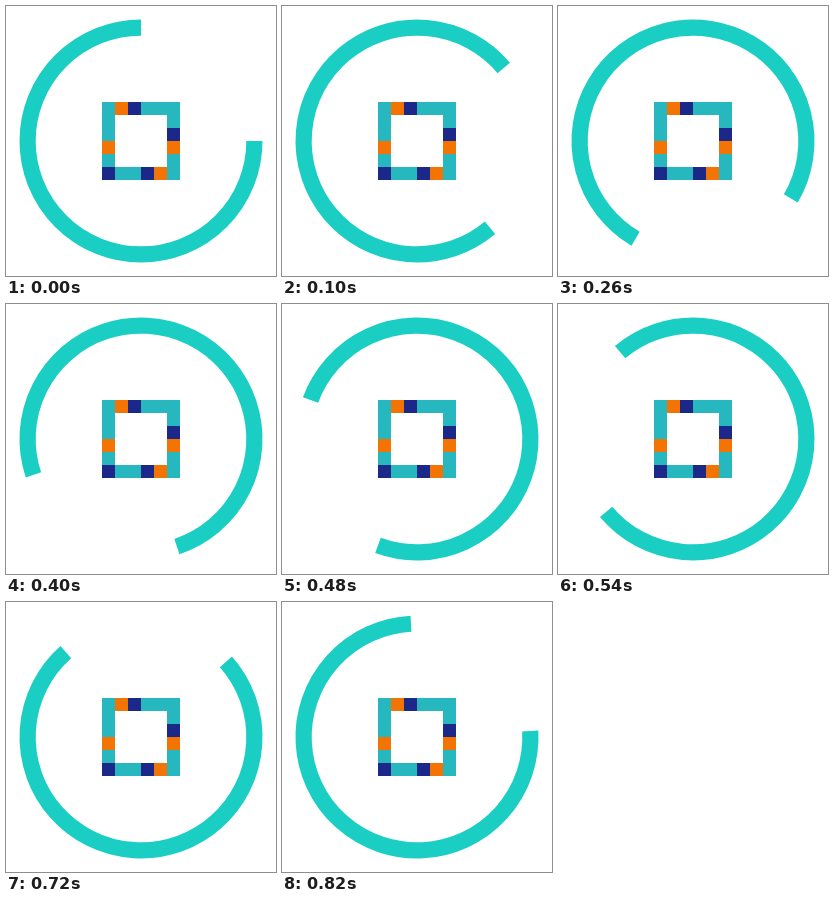
An HTML page that plays this animation: 270x270 px, repeating every 840 ms.

```html
<!DOCTYPE html>
<html lang="en">
<head>
<meta charset="utf-8">
<title>Loader</title>
<style>
  html, body { margin: 0; width: 100%; height: 100%; overflow: hidden; background: #fff; }
  svg { display: block; width: 100vw; height: 100vh; }
</style>
</head>
<body>
<svg viewBox="0 0 270 270">
  <circle id="ring" cx="135" cy="135" r="113.4" pathLength="4" stroke-dasharray="3 1"
          fill="none" stroke="#1bcec4" stroke-width="16.2"/>
  <g id="tiles" shape-rendering="crispEdges"></g>
</svg>
<script>
const LOOP = 840, STEP = 20;
const EDGE = 96, TILE = 13;
const ring = document.getElementById('ring');
const tiles = document.getElementById('tiles');

const colors = { t: '#26b8be', o: '#f37402', n: '#1b288a' };
const rows = ['tonttt', 't    t', 't    n', 'o    o', 't    t', 'nttnot'];

rows.forEach((row, y) => [...row].forEach((key, x) => {
  if (key === ' ') return;
  const rect = document.createElementNS(tiles.namespaceURI, 'rect');
  const attrs = {
    x: EDGE + x * TILE, y: EDGE + y * TILE,
    width: TILE, height: TILE, fill: colors[key]
  };
  for (const name in attrs) rect.setAttribute(name, attrs[name]);
  tiles.append(rect);
}));

// Smooth loss of a given angle, centred on step n = 0
const lag = (n, angle) => angle / (1 + Math.exp(-n / 1.6));

// Ten degrees per step, slowing once on the way and once before the top
const angleAt = n => 10 * n - lag(n - 14.85, 40) - lag(n - 40, 20);

// The dash pattern begins at three o'clock, where the gap ends
function draw(ms) {
  const n = Math.floor((ms % LOOP) / STEP);
  ring.setAttribute('transform', `rotate(${angleAt(n).toFixed(2)} 135 135)`);
}

let start;
function tick(now) {
  start ??= now;
  draw(Math.max(0, now - start));
  requestAnimationFrame(tick);
}
draw(0);
requestAnimationFrame(tick);
</script>
</body>
</html>
```
